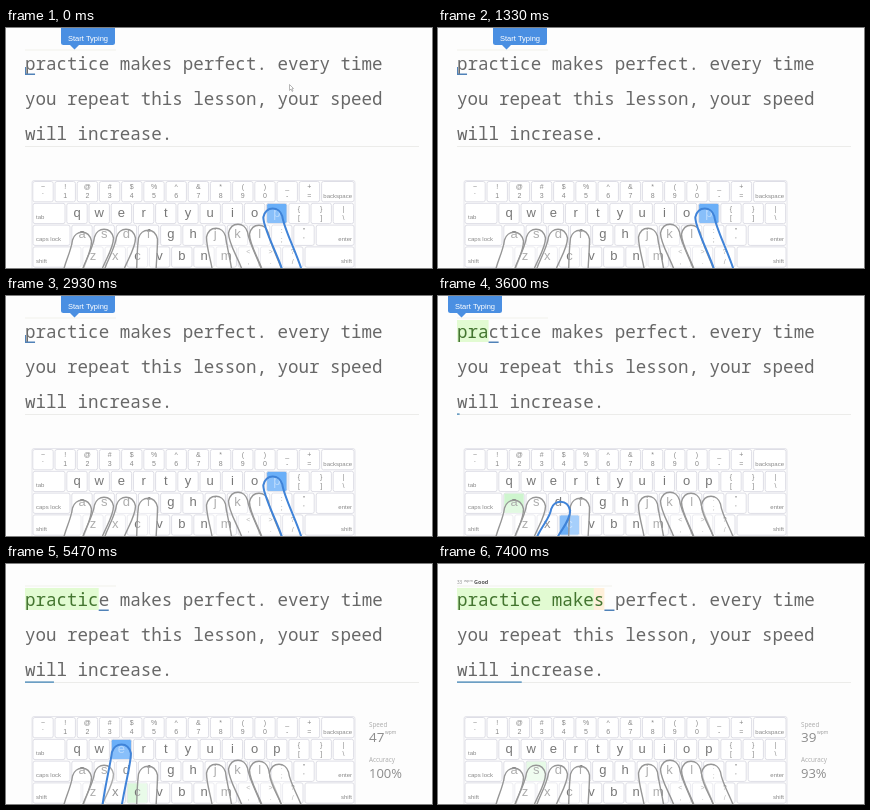
An HTML page with a canvas that plays this animation: 426 px wide and 240 px high, repeating every 7470 ms.

```html
<!DOCTYPE html>
<html lang="en">
<head>
<meta charset="utf-8">
<title>Typing lesson</title>
<style>
html, body { margin: 0; width: 100%; height: 100%; overflow: hidden; background: #fdfdfd; }
canvas { display: block; width: 100%; height: 100%; }
</style>
</head>
<body>
<canvas id="stage" width="426" height="240"></canvas>
<script>
const ctx = document.getElementById('stage').getContext('2d');
const LOOP = 7470, CHAR = 10.53, LEFT = 19;
const MONO = '17.55px "Noto Sans Mono", monospace';
const SANS = '"Liberation Sans", Arial, sans-serif';
const OPEN = '"Open Sans", sans-serif';
const BLUE = '#4a8fe2';

const lines = ['practice makes perfect. every time', 'you repeat this lesson, your speed', 'will increase.'];
const total = lines.join(' ').length;
const presses = [3300, 3430, 3560, 4130, 4700, 4950, 5200, 5500, 5880, 6000, 6130, 6270, 6520, 6900];

const clamp = v => Math.max(0, Math.min(1, v));
const ease = v => { v = clamp(v); return v * v * (3 - 2 * v); };
const mix = (a, b, k) => a + (b - a) * k;

// Keyboard: first key centre, row top, caps, wide key labels
const PITCH = 22.2;
const rows = [
  { x: 37, y: 153.5, caps: '~` !1 @2 #3 $4 %5 ^6 &7 *8 (9 )0 _- +=', right: 'backspace' },
  { x: 71, y: 175.3, caps: 'q w e r t y u i o p {[ }] |\\', left: 'tab' },
  { x: 76, y: 197.1, caps: 'a s d f g h j k l :; "\'', left: 'caps lock', right: 'enter' },
  { x: 87, y: 218.9, caps: 'z x c v b n m <, >. ?/', left: 'shift', right: 'shift' }
];
const keys = rows.flatMap(r => r.caps.split(' ').map((cap, i) => ({ cap, x: r.x + i * PITCH, y: r.y })));
const keyOf = Object.fromEntries(keys.map(k => [k.cap, k]));

// Fingers from left little to right little finger
const fingers = [
  [76, 203, 64], [98, 200, 82], [120, 200, 104], [142, 201, 140],
  [210, 199, 218], [232, 195, 250], [253, 196, 270], [273, 199, 290]
].map(([x, y, base], i) => ({ x, y, base, out: i < 4 ? -1 : 1 }));
const fingerFor = { p: 7, r: 3, a: 0, c: 2, t: 3, i: 5, e: 2, m: 4, k: 5, s: 1 };

function text(str, x, y, font, color, align = 'left') {
  ctx.font = font;
  ctx.fillStyle = color;
  ctx.textAlign = align;
  ctx.fillText(str, x, y);
}

function rect(x, y, w, h, color) {
  ctx.fillStyle = color;
  ctx.fillRect(x, y, w, h);
}

function keyCap(x, y, w, fill) {
  ctx.beginPath();
  ctx.roundRect(x, y, w, 20.3, 2);
  ctx.fillStyle = fill;
  ctx.fill();
  ctx.strokeStyle = '#dedee6';
  ctx.lineWidth = 1;
  ctx.stroke();
}

function drawLesson(t, n) {
  rect(LEFT, 21.5, n < 9 ? 91 : 155, 1, '#f1f1ec');
  rect(LEFT, 24, Math.min(n, 13) * CHAR, 22, '#e2fbd2');
  if (n > 13) rect(LEFT + 13 * CHAR, 24, CHAR, 22, '#fff0da');

  ctx.textBaseline = 'alphabetic';
  lines.forEach((line, i) => text(line.slice(i ? 0 : n), LEFT + (i ? 0 : n * CHAR), 42 + i * 35, MONO, '#686868'));
  text(lines[0].slice(0, n), LEFT, 42, MONO, '#43752f');
  rect(LEFT + n * CHAR, 45.5, CHAR - 0.5, 1.5, '#5082b8');
  if (!n) rect(LEFT, 39, 1, 7, '#5082b8');

  const done = presses.reduce((sum, at) => sum + ease((t - at) / 700), 0) / total;
  rect(LEFT, 118, 394, 1, '#ececea');
  rect(LEFT, 117.3, 394 * done, 1.7, '#6c9fc4');

  if (n > 8) {
    text('33', LEFT, 20, '4.5px ' + OPEN, '#888');
    text('wpm', 26, 18, '4px ' + OPEN, '#888');
    text('Good', 36, 20, 'bold 5.5px ' + OPEN, '#555');
  }
}

function drawTooltip(t) {
  ctx.save();
  ctx.globalAlpha = 1 - clamp((t - 4000) / 200);
  ctx.translate(mix(55, 10, ease((t - 3270) / 230)), 0);
  ctx.fillStyle = BLUE;
  ctx.beginPath();
  ctx.roundRect(0, -4, 54, 21, 2.5);
  ctx.moveTo(9, 17);
  ctx.lineTo(13.5, 21.5);
  ctx.lineTo(18, 17);
  ctx.fill();
  text('Start Typing', 27, 10.5, '7.5px ' + SANS, '#fff', 'center');
  ctx.restore();
}

function drawPointer() {
  ctx.beginPath();
  [[283.5, 56.5], [283.5, 62.5], [285, 61], [286.2, 63.5], [287, 63], [286, 60.7], [287.5, 60.5]]
    .forEach(p => ctx.lineTo(...p));
  ctx.closePath();
  ctx.fillStyle = '#fff';
  ctx.fill();
  ctx.strokeStyle = '#999';
  ctx.lineWidth = 0.7;
  ctx.stroke();
}

function drawKeyboard(t, n) {
  ctx.textBaseline = 'middle';
  ctx.beginPath();
  ctx.roundRect(26, 152.5, 323, 100, 2);
  ctx.strokeStyle = '#e6e6ec';
  ctx.lineWidth = 1;
  ctx.stroke();

  const small = '6px ' + SANS;
  for (const r of rows) {
    const end = r.x + r.caps.split(' ').length * PITCH - 10;
    if (r.left) {
      keyCap(27, r.y, r.x - 39, '#fff');
      text(r.left, 30, r.y + 14.5, small, '#888');
    }
    if (r.right) {
      keyCap(end, r.y, 348 - end, '#fff');
      text(r.right, 346, r.y + 14.5, small, '#888', 'right');
    }
  }

  const next = lines[0][n], last = lines[0][n - 1];
  for (const { cap, x, y } of keys) {
    const active = cap === next;
    keyCap(x - 10.2, y, 20.4, active ? '#6aaff8' : '#fff');
    if (!active && cap === last) {
      const glow = 1 - clamp((t - presses[n - 1]) / 1000);
      rect(x - 9.7, y + 0.5, 19.4, 19.3, `rgba(205,245,205,${glow})`);
    }
    if (cap.length > 1) {
      text(cap[0], x, y + 5.5, '7px ' + SANS, '#888', 'center');
      text(cap[1], x, y + 15, '7px ' + SANS, '#888', 'center');
    } else {
      text(cap, x, y + 9.8, '13px ' + SANS, active ? '#a8d0fc' : '#777', 'center');
    }
  }
}

function drawFinger({ x, y, base, out }, bend, active) {
  const w = 9.5;
  const curl = Math.max(bend, clamp((y - 203) / 16));
  const root = base + out * 12 * bend;
  ctx.beginPath();
  ctx.moveTo(root + out * w, 262);
  ctx.bezierCurveTo(root + out * w, 240 - 35 * curl, x + out * (w + 2), y + 25 - 29 * curl, x + out * w, y + 9 - 5 * curl);
  ctx.bezierCurveTo(x + out * w * 0.7, y - 1, x - out * w * 0.7, y - 2, x - out * w, y + 10);
  ctx.bezierCurveTo(x - out * w, y + 25, root - out * w, 240, root - out * w, 262);
  ctx.fillStyle = active ? 'rgba(255,255,255,.2)' : 'rgba(255,255,255,.4)';
  ctx.fill();
  ctx.strokeStyle = active ? '#3f83d8' : '#969696';
  ctx.lineWidth = active ? 2 : 1.4;
  ctx.stroke();
}

// How far each finger reaches for the key of character n
function pose(n) {
  const ch = lines[0][n], id = fingerFor[ch], key = keyOf[ch];
  const stretch = id === 3 ? 1 : 0;
  return fingers.map((f, i) => {
    const onHome = key && Math.abs(key.y - 197.1) < 1;
    const reach = i === id && !onHome;
    return {
      x: reach ? key.x + (f.out > 0 ? -4 : 0) : f.x,
      y: reach ? key.y + (key.y > 210 ? 0.5 : 4) : f.y + (i < 3 ? 4 * stretch : 0),
      bend: i < 3 ? stretch : 0
    };
  });
}

function drawHands(t, n) {
  const from = pose(Math.max(0, n - 1)), to = pose(n);
  const k = n ? ease((t - presses[n - 1]) / 130) : 1;
  const activeId = fingerFor[lines[0][n]];
  const draw = i => drawFinger({
    ...fingers[i],
    x: mix(from[i].x, to[i].x, k),
    y: mix(from[i].y, to[i].y, k)
  }, mix(from[i].bend, to[i].bend, k), i === activeId);
  fingers.forEach((f, i) => { if (i !== activeId) draw(i); });
  if (activeId !== undefined) draw(activeId);
}

function drawStats(n) {
  if (n < 4) return;
  const wpm = Math.round(n > 12 ? 44 - 2.5 * (n - 12) : 48 - (n - 4) / 2);
  const accuracy = n > 13 ? 93 : 100;
  ctx.textBaseline = 'alphabetic';
  text('Speed', 363, 162.5, '6.3px ' + OPEN, '#aaa');
  text(wpm, 363, 178, '13.5px ' + OPEN, '#8c8c8c');
  text('wpm', 379, 170, '4.8px ' + OPEN, '#999');
  text('Accuracy', 363, 198, '6.3px ' + OPEN, '#aaa');
  text(accuracy + '%', 363, 214, '13px ' + OPEN, '#8c8c8c');
}

const start = performance.now();
function frame() {
  const t = (performance.now() - start) % LOOP;
  const n = presses.filter(at => at <= t).length;
  rect(0, 0, 426, 240, '#fdfdfd');
  drawLesson(t, n);
  drawKeyboard(t, n);
  drawHands(t, n);
  drawStats(n);
  drawTooltip(t);
  if (t < 900) drawPointer();
  requestAnimationFrame(frame);
}
frame();
</script>
</body>
</html>
```
